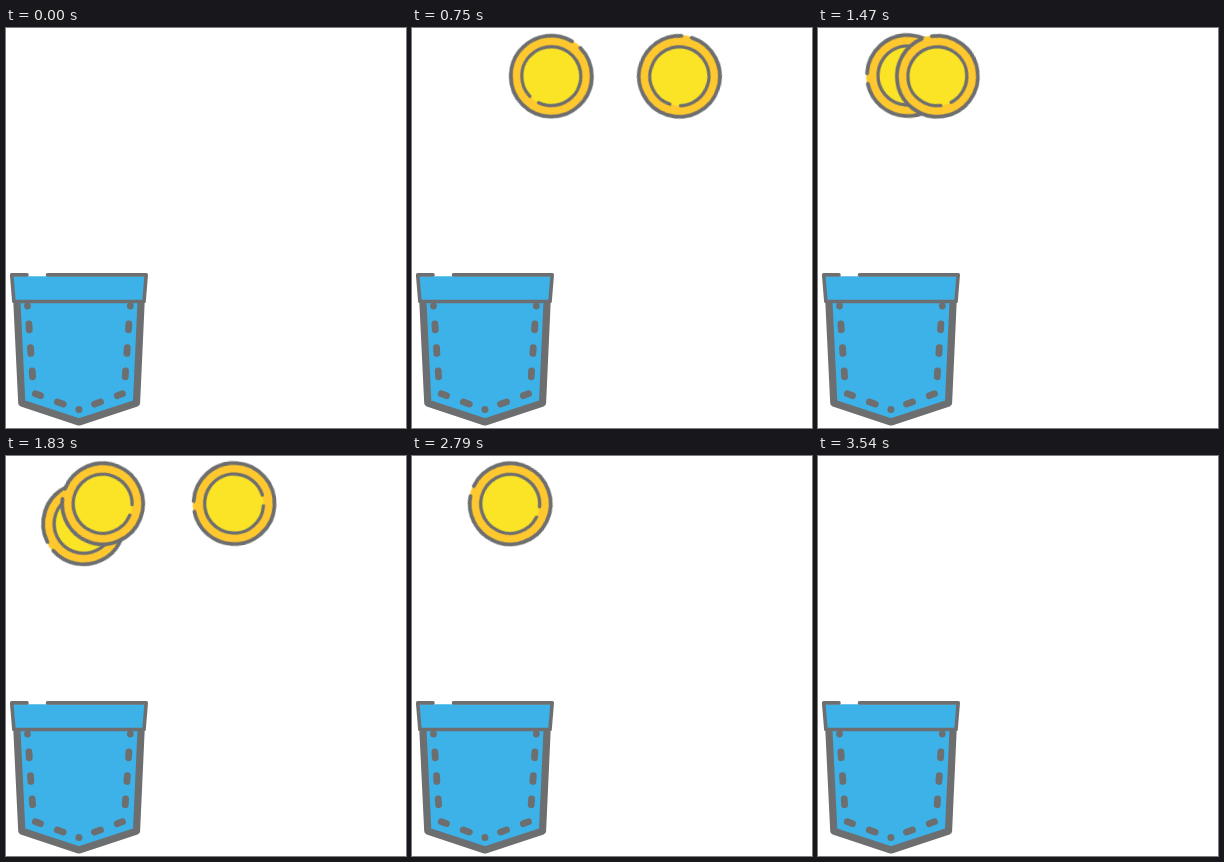
These frames come from a looping animation (400x400 px, 3.6 s). An HTML page:

```html
<!DOCTYPE html>
<html lang="en">
<head>
<meta charset="utf-8">
<title>Coins rolling into a pocket</title>
<style>
  html, body { margin: 0; width: 100%; height: 100%; overflow: hidden; background: #fff; }
  svg { display: block; width: 400px; height: 400px; }
  .line { fill: none; stroke: #6d6e70; stroke-linecap: round; stroke-linejoin: round; }
  .blue { fill: #3cb2e8; }

  .coin { animation: coin 3600ms infinite backwards; }
  .coin:nth-of-type(2) { animation-delay: 510ms; }
  .coin:nth-of-type(3) { animation-delay: 1500ms; }
  .pocket { animation: dip 3600ms infinite; }

  /* roll in along the top, then drop behind the pocket */
  @keyframes coin {
    0% {
      transform: translate(459px, 47.6px) rotate(778deg);
      animation-timing-function: cubic-bezier(.15, .673, .2, .87);
    }
    49.1667% {
      transform: translate(77px, 47.6px) rotate(-215deg);
      animation-timing-function: cubic-bezier(.333, 0, .667, .333);
    }
    55.278%, 100% { transform: translate(77px, 316px) rotate(-205deg); }
  }

  /* the pocket gives a little under each coin */
  @keyframes dip {
    0%, 53.333%, 56.667%, 67.5%, 70.833%, 95%, 98.333%, 100% { transform: translateY(0); }
    55%, 69.167%, 96.667% { transform: translateY(6px); }
  }
</style>
</head>
<body>
<svg viewBox="0 0 400 400">
  <defs>
    <g id="coin">
      <circle cx="-.7" r="41.4" fill="#ffc82e"/>
      <circle cx="-.7" r="29.5" fill="#fbe426"/>
      <g class="line" stroke-width="3.8">
        <circle r="40.5" pathLength="360" stroke-dasharray="345 15" transform="translate(-.7 0) rotate(7.5)"/>
        <circle r="29.5" pathLength="360" stroke-dasharray="339 21" stroke-width="3.3" transform="translate(-.7 0) rotate(188.5)"/>
      </g>
    </g>
    <path id="stitches" class="line" stroke-width="6.8"
      d="M21.5 278v.01M22.9 296l.4 5.8M24.5 319.6l.4 5.8M26.2 343l.4 5.8M29.3 365.7l5.2 2M51.3 373.9l6 2.2"/>
  </defs>

  <g class="coin"><use href="#coin"/></g>
  <g class="coin"><use href="#coin"/></g>
  <g class="coin"><use href="#coin"/></g>

  <g class="pocket">
    <path class="blue" d="M11 274 15.8 375.2 73 394 130.5 375.2 135 274Z"/>
    <path class="line" stroke-width="7.2" d="M11 276 15.8 375.2 73 394 130.5 375.2 135 276"/>
    <use href="#stitches"/>
    <use href="#stitches" transform="translate(145.8 0) scale(-1 1)"/>
    <path class="line" stroke-width="7" d="M72.9 381.6v.01"/>
    <path class="blue" d="M5.7 248.2H140.2L138 273.5H7.9Z"/>
    <path class="line" stroke-width="3.6" d="M21 246.9H5.7L7.9 273.5H138L140.2 246.9H41.5"/>
  </g>
</svg>
</body>
</html>
```
